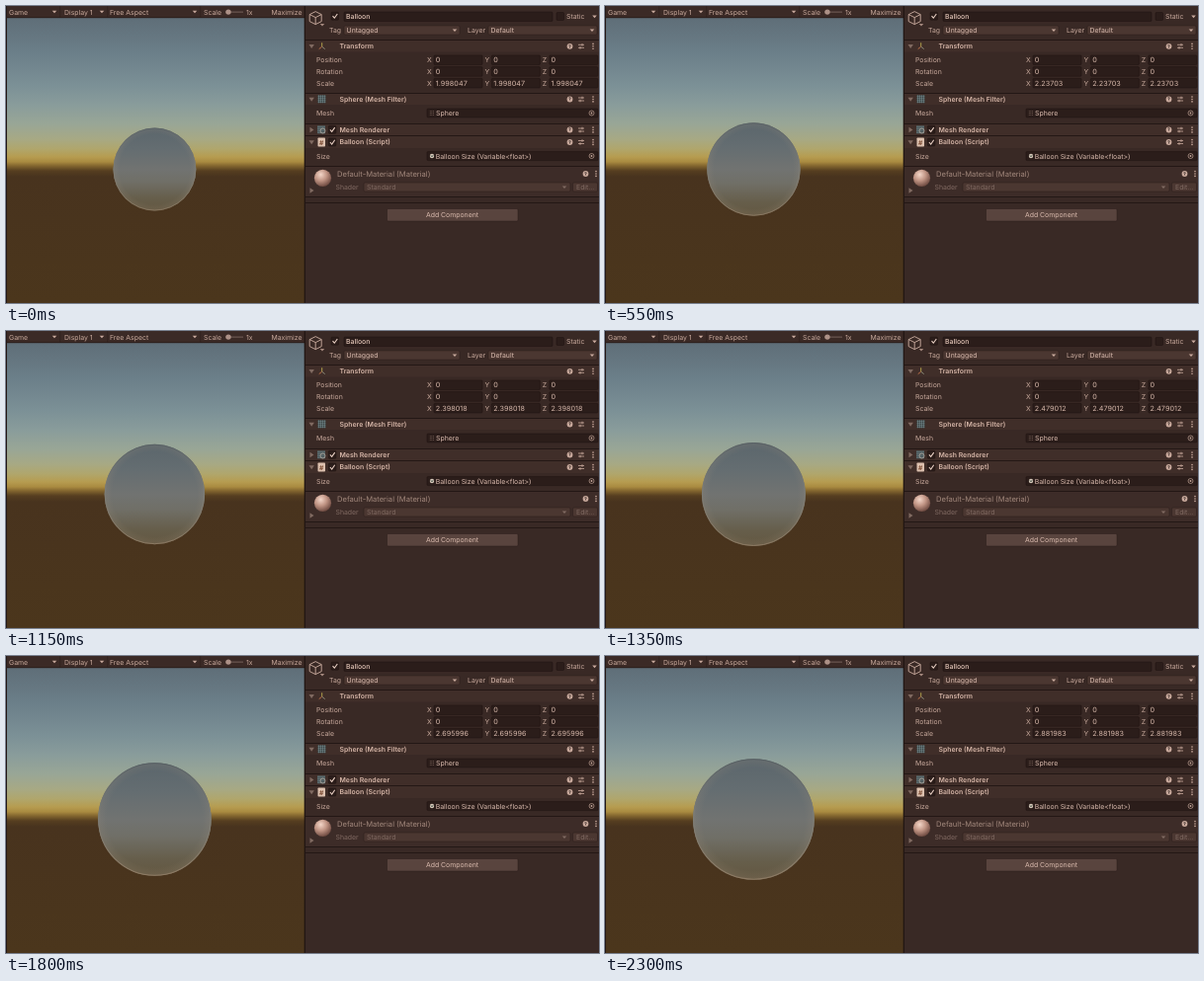
Animation of 600 by 301 pixels, one loop 2.35 s. Source, as an HTML page:

```html
<!DOCTYPE html>
<html lang="en">
<head>
<meta charset="utf-8">
<title>Balloon inspector</title>
<style>
html, body { margin: 0; width: 100%; height: 100%; overflow: hidden; background: #392925; }
svg { display: block; width: 100%; height: 100%; }
text { font: 6.9px Inter, "Open Sans", sans-serif; fill: #c9aa9d; white-space: pre; text-rendering: geometricPrecision; }
.b { font-weight: 600; fill: #d6b6a8; }
.dim { fill: #806a62; }
.val { fill: #dabbae; }
.name { font-weight: 500; fill: #e6c8ba; }
.num { font-size: 7.2px; letter-spacing: .05px; fill: #d6b7aa; }
</style>
</head>
<body>
<svg id="stage" viewBox="0 0 600 301" preserveAspectRatio="none">
  <defs>
    <linearGradient id="sky" gradientUnits="userSpaceOnUse" x1="0" y1="0" x2="0" y2="301"></linearGradient>
    <linearGradient id="skin" x1="0" y1="0" x2="0" y2="1">
      <stop offset="0" stop-color="#5b666c"/>
      <stop offset=".25" stop-color="#646d71"/>
      <stop offset=".5" stop-color="#717371"/>
      <stop offset=".65" stop-color="#706f67"/>
      <stop offset=".85" stop-color="#665e4b"/>
      <stop offset="1" stop-color="#635741"/>
    </linearGradient>
    <radialGradient id="rim">
      <stop offset=".85" stop-color="#a6947f" stop-opacity="0"/>
      <stop offset="1" stop-color="#a6947f" stop-opacity=".16"/>
    </radialGradient>
    <linearGradient id="edge" x1="0" y1="0" x2="0" y2="1">
      <stop offset="0" stop-color="#565f63"/>
      <stop offset=".45" stop-color="#7c7d77"/>
      <stop offset="1" stop-color="#8d7a63"/>
    </linearGradient>
    <radialGradient id="ball" cx=".38" cy=".3" r=".8">
      <stop offset="0" stop-color="#f3d6c8"/>
      <stop offset=".45" stop-color="#c09484"/>
      <stop offset="1" stop-color="#5c3a32"/>
    </radialGradient>
  </defs>
  <g id="ui"></g>
  <g id="balloon">
    <circle r="1" fill="url(#skin)"/>
    <circle r="1" fill="url(#rim)"/>
    <circle r=".99" fill="none" stroke="url(#edge)" stroke-width=".018"/>
  </g>
</svg>
<script>
const ui = document.getElementById('ui');
const balloon = document.getElementById('balloon');
const INK = '#c9aa9d', LINE = '#231715', FIELD = '#2b1d1a', BUTTON = '#4b3731';

function add(tag, attrs, content, parent = ui) {
  const el = document.createElementNS('http://www.w3.org/2000/svg', tag);
  for (const key in attrs) el.setAttribute(key, attrs[key]);
  if (content !== undefined) el.textContent = content;
  return parent.appendChild(el);
}
const box = (x, y, width, height, fill, more) => add('rect', { x, y, width, height, fill, ...more });
const label = (x, y, content, cls = '') => add('text', { x, y, class: cls }, content);
const stroke = (d, color = INK, width = .8) =>
  add('path', { d, fill: 'none', stroke: color, 'stroke-width': width });
const fill = (d, color = INK) => add('path', { d, fill: color });
const dot = (cx, cy, r, color = INK) => add('circle', { cx, cy, r, fill: color });
const rule = y => box(303, y, 297, 1, LINE);
const field = (x, y, w, h = 9) =>
  box(x, y, w, h, FIELD, { rx: 1, stroke: '#1f1311', 'stroke-width': .5 });
const button = (x, y, w, h = 9, color = BUTTON) =>
  box(x, y, w, h, color, { rx: 1.2, stroke: '#2b1d1a', 'stroke-width': .5 });
const arrow = (x, y, color) => fill(`M${x - 2.3} ${y - 1.1}h4.6l-2.3 2.6z`, color);

function fold(y, open) {
  if (open) fill(`M306.5 ${y - 1.8}h5.4l-2.7 4z`, '#806a61');
  else fill(`M307.5 ${y - 2.7}v5.4l4-2.7z`, '#806a61');
}
function check(x, y, on) {
  field(x, y, 7.5, 8);
  if (on) stroke(`M${x + 1.5} ${y + 4}l1.8 2 3-4.2`, '#e8cfc3', 1.1);
}
function help(x, y) {
  dot(x, y, 2.9);
  add('text', { x, y: y + 1.9, 'text-anchor': 'middle', style: 'font-size:5px;font-weight:700;fill:#392925' }, '?');
}
function menu(x, y) {
  for (let i = -1; i < 2; i++) dot(x, y + i * 2.4, .8);
}
function header(y, height, title, open) {
  box(303, y, 297, height, '#402e29');
  rule(y - 1);
  const mid = y + height / 2;
  fold(mid, open);
  label(337.5, mid + 2.4, title, 'b');
  help(570.5, mid);
  stroke(`M579 ${mid - 1.5}h6M579 ${mid + 1.5}h6M583 ${mid - 2.8}v2.6M581 ${mid + .2}v2.6`);
  menu(594, mid);
}
function grid(x, y) {
  box(x, y, 8, 8, '#343c3d');
  for (let i = 0; i < 4; i++)
    stroke(`M${x + 1 + i * 2} ${y}v8M${x} ${y + 1 + i * 2}h8`, '#86a0a3', .45);
}
function picker(y) {
  add('circle', { cx: 592.5, cy: y, r: 2.5, fill: 'none', stroke: INK, 'stroke-width': .65 });
  dot(592.5, y, .9);
}

// Sky: height on the stage and colour
[
  [12, '#5f6e78'], [50, '#6c808a'], [80, '#7b9096'], [100, '#899c9b'],
  [120, '#99a696'], [135, '#a7a984'], [145, '#b0a66c'], [153, '#b69c50'],
  [158, '#a98a40'], [162, '#82652f'], [167, '#563e20'], [173, '#48331e'], [301, '#4b361c']
].forEach(([y, color]) =>
  add('stop', { offset: y / 301, 'stop-color': color }, '', document.getElementById('sky')));

// Game view
box(0, 0, 600, 301, '#392925');
box(1, 12, 301, 289, 'url(#sky)');
box(0, 0, 302, 12, '#3b2a26');
box(0, 11.5, 302, .7, LINE);
[['Game', 3, 49], ['Display 1', 59, 97], ['Free Aspect', 105, 191]].forEach(([name, x, tip]) => {
  label(x, 8.6, name);
  arrow(tip, 5.8);
  box(tip + 5.5, 0, .6, 12, '#2c1e1b');
});
label(200, 8.6, 'Scale');
box(222, 5.6, 18, 1, '#76605a');
dot(225, 6.1, 2.7, '#ad9187');
label(243, 8.6, '1x');
label(268.5, 8.6, 'Maximize');
box(0, 0, 1, 301, LINE);
box(301.7, 0, 1.3, 301, '#211613');

// Object header
stroke('M313.2 5.6l6 3v7l-6 3-6-3v-7zM307.2 8.6l6 3 6-3M313.2 11.6v7', '#cdafa2', .9);
arrow(320, 19, '#a68a7f');
check(329, 6.2, true);
field(342, 6, 211, 9.5);
label(344, 13.2, 'Balloon', 'name');
check(557, 6.5, false);
label(567, 13.2, 'Static');
arrow(595.5, 10.7);
label(327, 27, 'Tag');
button(342, 20, 117);
label(344.5, 27, 'Untagged', 'val');
arrow(454, 24.5);
label(467, 27, 'Layer');
button(488, 20, 110);
label(490.5, 27, 'Default', 'val');
arrow(593, 24.5);

// Transform
header(35, 11.6, 'Transform', true);
stroke('M319.7 41.2v-4', '#b0a04a', 1);
stroke('M319.7 41.2l-3 2.4', '#bd7049', 1);
stroke('M319.7 41.2l3 2.4', '#8a8a78', 1);
const values = [];
['Position', 'Rotation', 'Scale'].forEach((name, row) => {
  const y = 57.2 + row * 11.7;
  label(314, y, name);
  ['X', 'Y', 'Z'].forEach((axis, col) => {
    const x = 433 + col * 58.4;
    label(x - 7, y, axis);
    field(x, y - 7.3, 49, 9.7);
    const value = label(x + 1.8, y, '0', 'num');
    if (row === 2) values.push(value);
  });
});

// Mesh filter and renderer
header(89, 11, 'Sphere (Mesh Filter)', true);
grid(315.5, 90.3);
label(314, 111, 'Mesh');
field(426, 104, 173);
for (let i = 0; i < 9; i++) dot(429.2 + i % 3 * 1.7, 106.8 + Math.floor(i / 3) * 1.7, .45, '#9a8177');
label(435, 111, 'Sphere', 'val');
picker(108.5);
header(120, 11, 'Mesh Renderer', false);
grid(315, 121.3);
add('circle', { cx: 320.5, cy: 126.5, r: 2.5, fill: 'none', stroke: '#c1b5a9', 'stroke-width': .7 });
check(326.4, 121.3, true);

// Script
header(132, 12, 'Balloon (Script)', true);
box(315.5, 133.5, 7.5, 9, '#dcc0ae', { rx: .8 });
add('text', { x: 319.2, y: 140.5, 'text-anchor': 'middle', style: 'font-size:6.5px;font-weight:700;fill:#7c4c34' }, '#');
check(326.4, 134, true);
label(314, 154.6, 'Size');
field(426, 147.6, 173);
dot(431, 152, 2.2, '#d8cabb');
stroke('M429.9 151.3l1.1 1.6 1.2-1.8', '#33433a', .8);
label(434.7, 154.6, 'Balloon Size (Variable<float>)', 'val');
picker(152);

// Material
rule(162);
box(303, 163, 297, 30, '#3d2c28');
dot(320.5, 174.3, 8.6, 'url(#ball)');
add('text', { x: 335, y: 172.7, style: 'font-size:7.6px;fill:#a1877b' }, 'Default-Material (Material)');
help(586.5, 170);
menu(597, 170);
fold(187, false);
label(333.5, 186.3, 'Shader', 'dim');
button(362, 179, 209);
label(365, 186.3, 'Standard', 'dim');
arrow(565, 183.6, '#806a62');
button(573.5, 179, 25);
label(577, 186.3, 'Edit...', 'dim');
rule(193);
rule(199);
button(385.5, 205.5, 132.5, 12.5, '#59443e');
add('text', { x: 451.5, y: 214.4, 'text-anchor': 'middle', class: 'val' }, 'Add Component');

// Inflation: [time, steps of 0.001], with a small rounding drift per step
const LOOP = 2350, TICK = 50;
const growth = [[0, 0], [550, 239], [900, 346], [1150, 400], [1600, 583], [1800, 698], [2300, 884]];

function stepsAt(t) {
  const i = Math.max(1, growth.findIndex(key => key[0] >= t));
  const [t0, n0] = growth[i - 1], [t1, n1] = growth[i];
  return Math.round(n0 + (n1 - n0) * (t - t0) / (t1 - t0));
}
function draw(time) {
  const t = Math.floor(time % LOOP / TICK) * TICK;
  const size = 1.998047 + stepsAt(t) * (0.001 - 7.24e-8);
  const shown = String(+size.toFixed(6));
  values.forEach(el => { el.textContent = shown; });
  const radius = 41.9 + (size - 1.998) * 22;
  balloon.setAttribute('transform', `translate(150.4 165.5) scale(${radius})`);
}
const start = performance.now();
function loop() {
  draw(performance.now() - start);
  requestAnimationFrame(loop);
}
loop();
</script>
</body>
</html>
```
